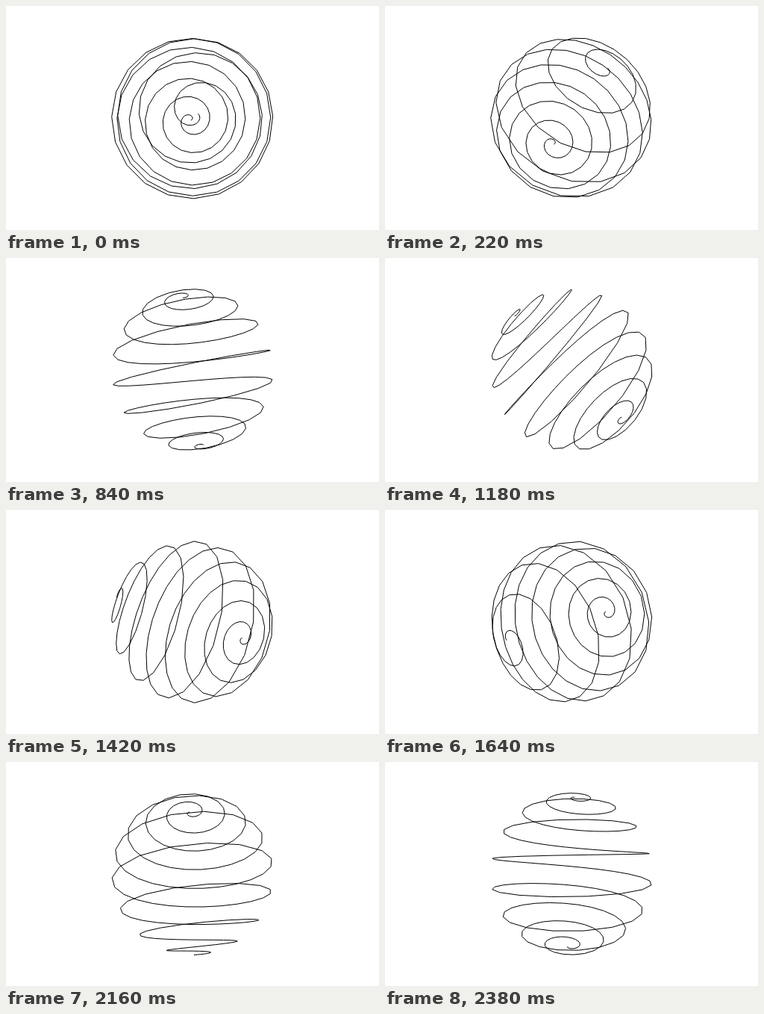
Write an HTML page that moves like this. It is 500 px wide and 300 px high and loops after 2.4 s.

```html
<!DOCTYPE html>
<html lang="en">
<head>
<meta charset="utf-8">
<title>Turning sphere spiral</title>
<style>
  html, body { margin: 0; width: 100%; height: 100%; overflow: hidden; background: #fff; }
  svg { display: block; width: 100vw; height: 100vh; }
</style>
</head>
<body>
<svg viewBox="0 0 500 300">
  <path id="spiral" fill="none" stroke="#000" stroke-width="1"/>
</svg>
<script>
  const LOOP = 2400, STEP = 20;
  const CX = 250, CY = 150, RADIUS = 100, EYE = 260;
  const TURNS = 9, POINTS = 180;
  const TILT = 0.04, SPIN = 0.03; // radians per step about x and y
  const { sin, cos, PI, floor } = Math;
  const path = document.getElementById('spiral');

  // Sphere points, one per degree of polar angle
  const points = Array.from({ length: POINTS }, (_, i) => {
    const polar = (i + 1) / POINTS * PI;
    const turn = 2 * TURNS * polar;
    return [sin(polar) * cos(turn), sin(polar) * sin(turn), cos(polar)].map(v => v * RADIUS);
  });

  function project([x, y, z], a, b) {
    const y1 = y * cos(a) - z * sin(a);
    const z1 = y * sin(a) + z * cos(a);
    const x2 = x * cos(b) + z1 * sin(b);
    const z2 = z1 * cos(b) - x * sin(b);
    const scale = EYE / (EYE - z2);
    return (CX + x2 * scale).toFixed(2) + ' ' + (CY + y1 * scale).toFixed(2);
  }

  function render(ms) {
    const n = floor((ms % LOOP) / STEP) + 1;
    path.setAttribute('d', 'M' + points.map(p => project(p, n * TILT, n * SPIN)).join('L'));
  }

  const start = performance.now();
  function tick() {
    render(performance.now() - start);
    requestAnimationFrame(tick);
  }
  render(0);
  requestAnimationFrame(tick);
</script>
</body>
</html>
```
